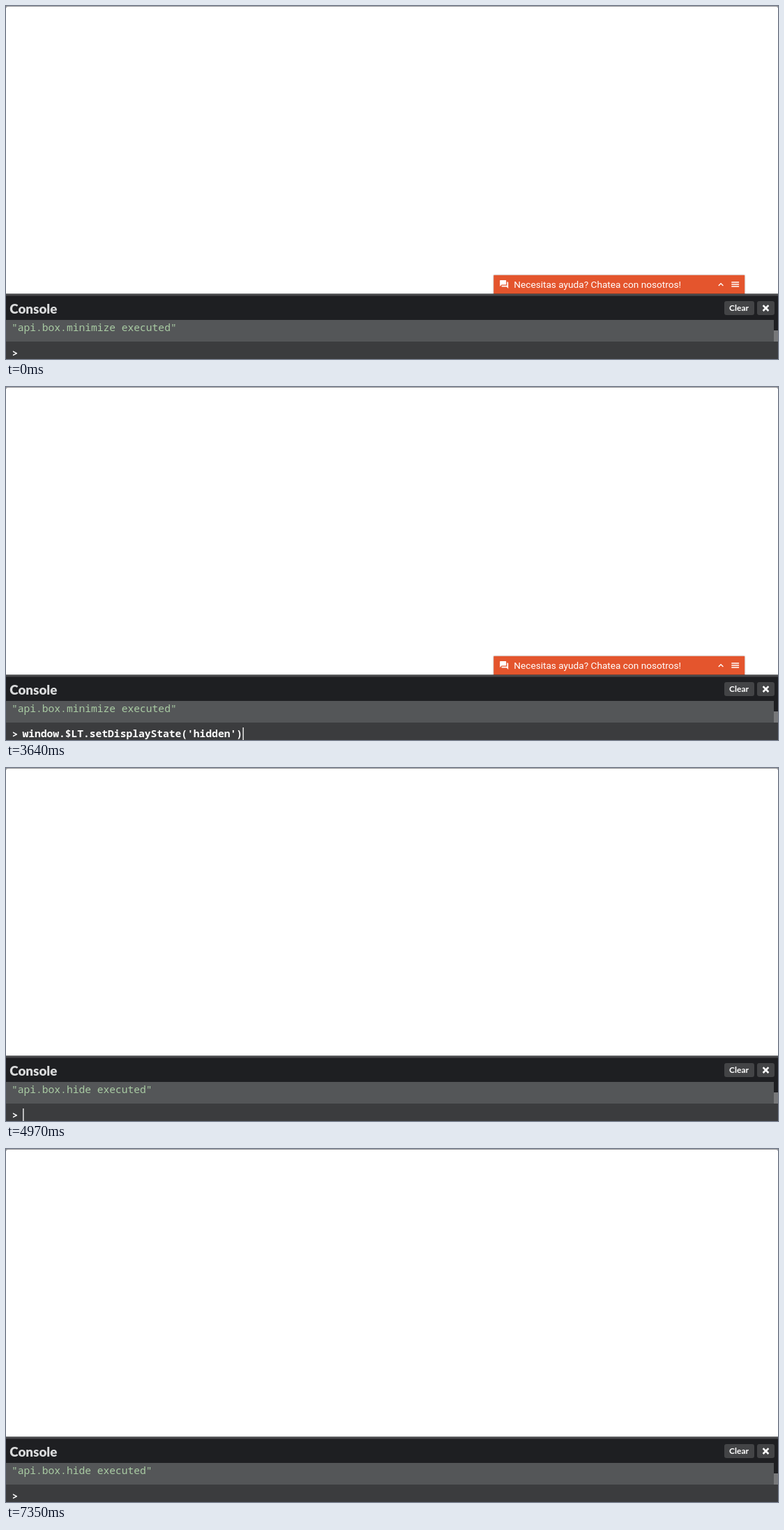
Recreate the animation shown at these times as an HTML page. Size 1107 by 506 pixels, loop 7770 ms.

```html
<!DOCTYPE html>
<html lang="es">
<head>
<meta charset="utf-8">
<title>Console</title>
<style>
  html, body { margin: 0; width: 100%; height: 100%; overflow: hidden; background: #fff; }
  svg { display: block; }
  text { white-space: pre; }
  .mono { font: 500 14.62px "Noto Sans Mono", "DejaVu Sans Mono", monospace; fill: #a9cba3; }
  .mono.code { font-weight: 600; fill: #fff; }
  .lato { font-family: Lato, sans-serif; font-weight: 700; }
  .line { fill: none; stroke: #fff; }
</style>
</head>
<body>
<svg width="1107" height="506" viewBox="0 0 1107 506">
  <defs>
    <filter id="shadow" x="-5%" y="-30%" width="110%" height="160%" color-interpolation-filters="sRGB">
      <feDropShadow dx="0" dy="0" stdDeviation="1.3" flood-color="#000" flood-opacity=".35"/>
    </filter>
  </defs>

  <rect width="1107" height="12" fill="#98989a"/>
  <rect y="1" width="1107" height="420" rx="3" fill="#fff"/>

  <g id="chat">
    <rect x="699.3" y="385.8" width="359.9" height="30" fill="#e4552d" filter="url(#shadow)"/>
    <path transform="translate(707 391.8) scale(.6)" fill="#fff"
      d="M21 6h-2v9H6v2c0 .55.45 1 1 1h11l4 4V7c0-.55-.45-1-1-1zm-4 6V3c0-.55-.45-1-1-1H3c-.55 0-1 .45-1 1v14l4-4h10c.55 0 1-.45 1-1z"/>
    <text x="728.3" y="404" font-family="Roboto, sans-serif" font-size="13.65" fill="#fff">Necesitas ayuda? Chatea con nosotros!</text>
    <path class="line" stroke-width="1.3" d="M1021.8 401l3.3-3.3 3.3 3.3"/>
    <path class="line" stroke-width="1.3" d="M1040.3 396h10.8m-10.8 3h10.8m-10.8 3h10.8"/>
  </g>

  <rect y="412.6" width="1107" height="94" fill="#1e1f22"/>
  <rect y="412.6" width="1107" height="2.9" fill="#48494b"/>
  <text class="lato" x="5.3" y="440.5" font-size="18.8" style="font-weight:900" fill="#d9dadb">Console</text>
  <rect x="1030" y="423" width="43" height="20" rx="3" fill="#434446"/>
  <text class="lato" x="1051" y="437.2" font-size="12" text-anchor="middle" fill="#fff">Clear</text>
  <rect x="1077" y="423" width="25" height="20" rx="3" fill="#434446"/>
  <path class="line" stroke-width="2.6" d="M1085.6 429.2l7.8 7.8m0-7.8l-7.8 7.8"/>

  <rect id="row" y="450" width="1101" height="31"/>
  <text id="log" class="mono" x="8" y="466"></text>
  <rect x="1101" y="465" width="6" height="16" fill="#77787a"/>

  <rect y="481" width="1107" height="25" fill="#3b3c3e"/>
  <text class="mono code" x="8.7" y="502.5" style="font-size:14px;font-weight:800">&gt;</text>
  <text id="input" class="mono code" x="23.4" y="502"></text>
  <rect id="caret" y="488" width="1.3" height="18" fill="#fff"/>

  <g id="ring" fill="none">
    <circle r="21" stroke="#d8d8d8" stroke-width="2.8"/>
    <circle r="21" stroke="#222" stroke-width="1.4"/>
  </g>
  <path id="arrow" fill="#000" stroke="#fff" stroke-width="1.1"
    d="M0 0v14.5l3.4-3.2 2.3 5.2 2.3-1-2.3-5.1h4.6z"/>
  <g id="beam" fill="none">
    <path stroke="#85868a" stroke-width="2.4" stroke-opacity=".55" d="M-3-7q3 0 3 2v10q0 2-3 2M3-7q-3 0-3 2m0 10q0 2 3 2"/>
    <path stroke="#0c0c0d" stroke-width="1.2" d="M-3-7q3 0 3 2v10q0 2-3 2M3-7q-3 0-3 2m0 10q0 2 3 2M-1.8 3h3.6"/>
  </g>
</svg>
<script>
const LOOP = 7770, STEP = 70, CHAR = 8.772;
const COMMAND = "window.$LT.setDisplayState('hidden')";
const PASTE = 3150, ENTER = 4830, RESULT = 4970;

// Each track lists time, x, y; positions in between are interpolated.
const tracks = [
  { kind: "arrow", end: 2100, points: [[280, 470, 504], [770, 334, 494.5], [2030, 334, 494.5]] },
  { kind: "beam", end: PASTE, points: [[2100, 325, 498], [2380, 284, 498]] },
  { kind: "beam", end: 7350, points: [[5670, 274, 498], [5810, 181, 498], [5880, 181, 498],
    [6580, 101, 458], [6790, 101, 458], [7000, 373, 492], [7140, 373, 492], [7280, 498, 500]] }
];
const caretOn = [[2380, 2940], [PASTE, 3710], [4200, 4690], [ENTER, 5460], [5950, 6440]];
const clicks = [[840, 910]];

const el = id => document.getElementById(id);
const [chat, row, log, input, caret, ring, arrow, beam] =
  ["chat", "row", "log", "input", "caret", "ring", "arrow", "beam"].map(el);
const show = (node, on) => node.setAttribute("visibility", on ? "visible" : "hidden");
const move = (node, x, y) => node.setAttribute("transform", `translate(${x} ${y})`);
const within = (spans, t) => spans.some(([from, to]) => t >= from && t < to);

function place(points, t) {
  const next = points.findIndex(p => p[0] > t);
  if (next < 0) return points[points.length - 1].slice(1);
  const [t0, x0, y0] = points[next - 1], [t1, x1, y1] = points[next];
  const k = (t - t0) / (t1 - t0);
  return [x0 + (x1 - x0) * k, y0 + (y1 - y0) * k];
}

function drawPointer(t) {
  const track = tracks.find(c => t >= c.points[0][0] && t < c.end);
  const [x, y] = track ? place(track.points, t) : [0, 0];
  for (const [node, kind] of [[arrow, "arrow"], [beam, "beam"]]) {
    show(node, track && track.kind === kind);
    move(node, x, y);
  }
  show(ring, within(clicks, t));
  move(ring, x - 0.3, y + 2.5);
}

function draw(t) {
  const typed = t >= PASTE && t < ENTER;
  const echo = t >= ENTER && t < RESULT;
  const action = t < ENTER ? "minimize" : "hide";
  show(chat, t < RESULT);
  row.setAttribute("fill", echo ? "#343538" : "#545658");
  log.textContent = echo ? COMMAND : `"api.box.${action} executed"`;
  log.classList.toggle("code", echo);
  input.textContent = typed ? COMMAND : "";
  caret.setAttribute("x", typed ? 23.7 + COMMAND.length * CHAR : 24.2);
  show(caret, within(caretOn, t));
  drawPointer(t);
}

const start = performance.now();
function tick() {
  const t = (performance.now() - start) % LOOP;
  draw(Math.floor(t / STEP) * STEP);
  requestAnimationFrame(tick);
}
tick();
</script>
</body>
</html>
```
